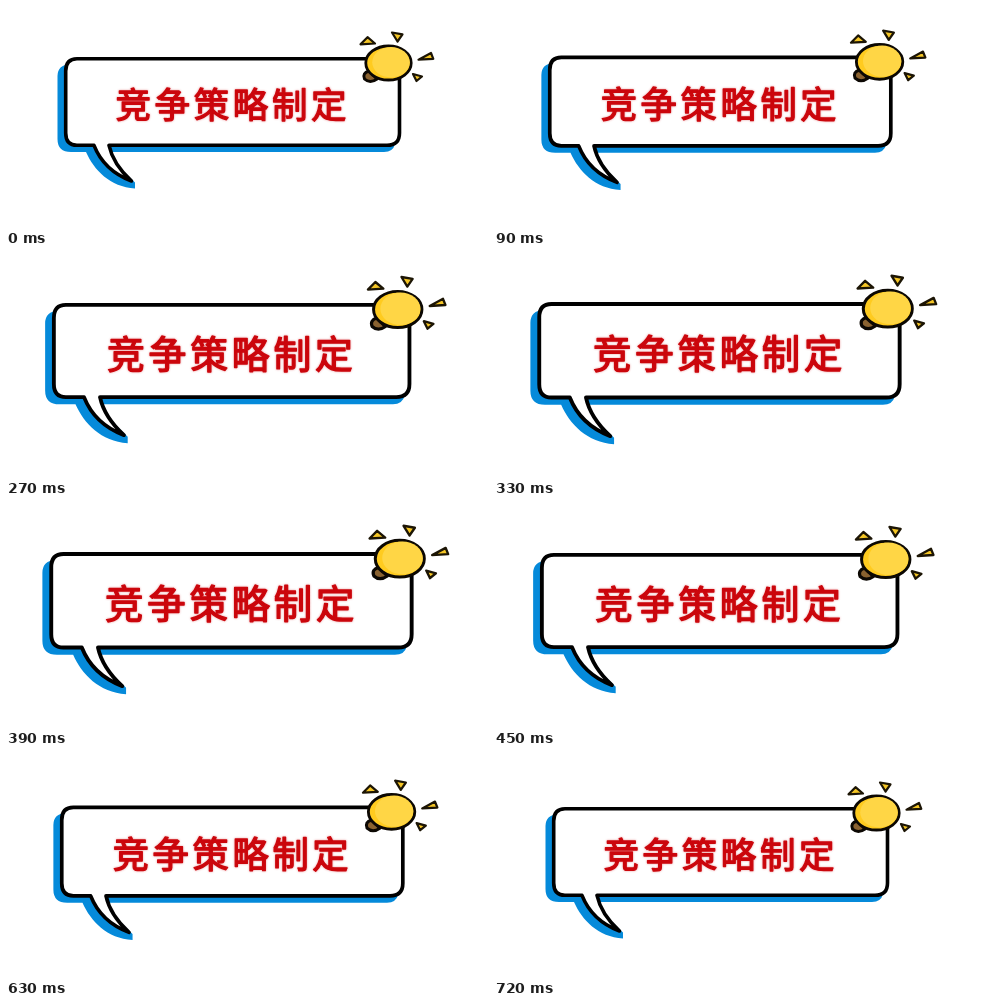
An HTML page for the animation above (750 ms loop, 482 by 222 pixels).

```html
<!DOCTYPE html>
<html lang="zh">
<head>
<meta charset="utf-8">
<style>
  html, body { margin: 0; width: 100%; height: 100%; overflow: hidden; background: #fff; }
  svg { display: block; width: 482px; height: 222px; }
  text {
    font: 400 35.5px "Noto Sans CJK SC", "Noto Sans CJK", sans-serif; letter-spacing: 3.6px;
    fill: #cb060c; stroke: #cb060c; stroke-width: 1.3px;
    filter: drop-shadow(0 0 1px #cb060c66);
  }
</style>
</head>
<body>
<svg viewBox="0 0 482 222" stroke-linejoin="round">
  <g id="badge">
    <path fill="#058ada" d="M64 58Q51.5 59 51.5 70V133Q51.5 146 65 146H80C88 164 104 181 129 182.5V176.5L98 146H378Q387 146 389 138L70 130V58Z"/>
    <path fill="#fff" stroke="#000" stroke-width="3.6" d="M71 52.7H381Q393.5 52.7 393.5 65V127Q393.5 139.3 381 139.3H103Q107 158 125.5 175C107 168 95 157 88 139.3H71Q59.7 139.3 59.7 127V65Q59.7 52.7 71 52.7Z"/>
    <text x="109.5" y="111.5">竞争策略制定</text>
    <g stroke="#1c1505" stroke-width="2.2" fill="#f5c626">
      <path d="M354.5 38.3L361.5 31.2L369 37.5Z"/>
      <path d="M386 26.5L396.5 28.3L391.5 35.5Z"/>
      <path d="M412.5 53.7L425 47L427.3 52.8Z"/>
      <path d="M407 68L416 70.5L410.5 75Z"/>
    </g>
    <path fill="#8a6230" stroke="#0c0803" stroke-width="3" d="M363 65Q356 67 358.5 73Q364 78 371 73Z"/>
    <ellipse cx="382.5" cy="57" rx="22.7" ry="17" fill="#ffcb1f" stroke="#0c0803" stroke-width="2.8"/>
    <ellipse cx="385" cy="56.3" rx="18.8" ry="15.2" fill="#ffd645"/>
  </g>
</svg>
<script>
  const badge = document.getElementById("badge");
  const LOOP = 750, STEP = 30, PEAK = 360, GROWTH = 0.087;

  function draw(now) {
    const t = Math.floor(now % LOOP / STEP) * STEP;
    const scale = 1 + GROWTH * (1 - Math.abs(1 - t / PEAK));
    badge.setAttribute("transform", `translate(241 111) scale(${scale}) translate(-241 -111)`);
    requestAnimationFrame(draw);
  }
  draw(0);
</script>
</body>
</html>
```
